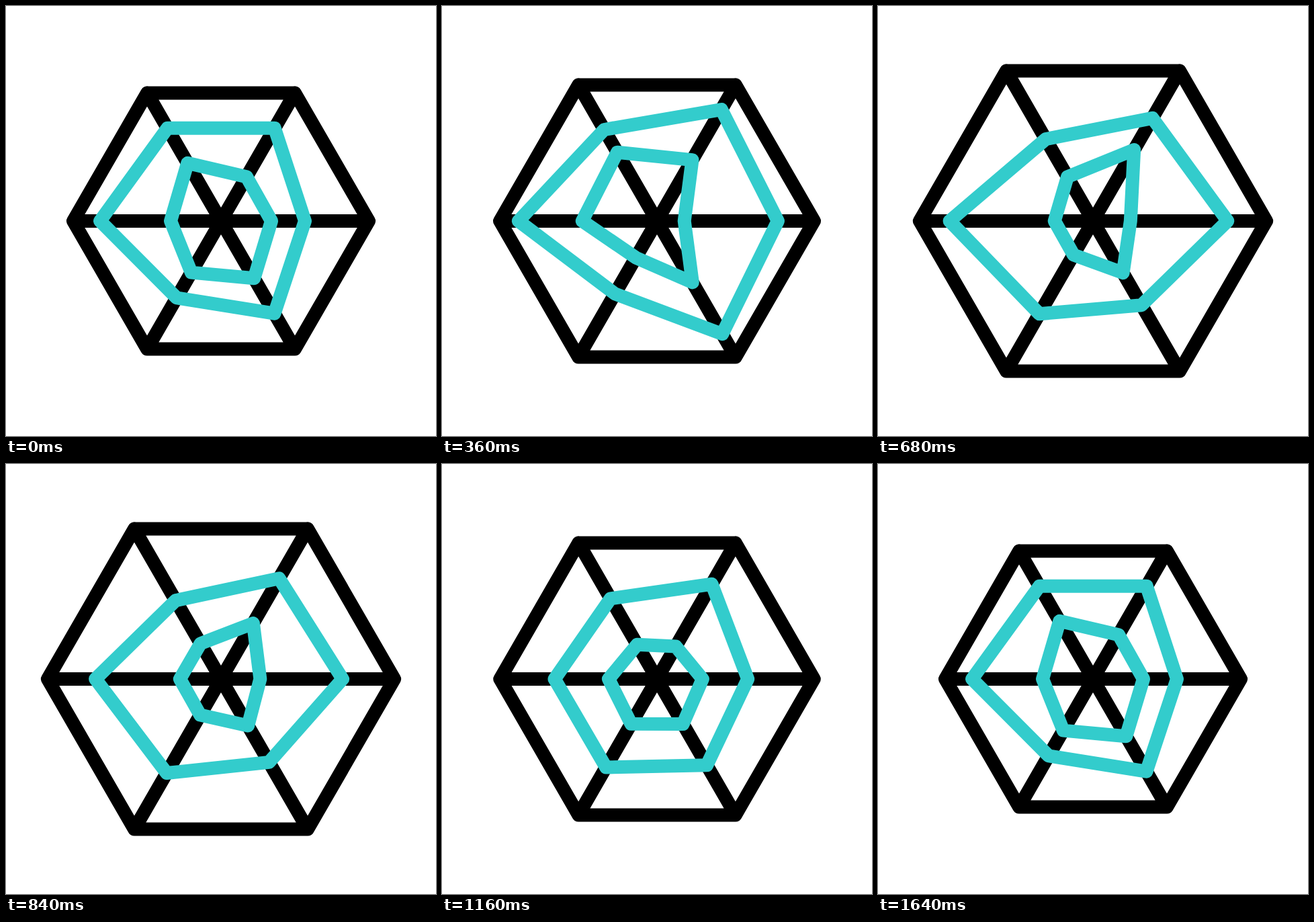
Write an HTML page that moves like this. It is 640 by 640 pixels and loops after 1.76 s.

```html
<!DOCTYPE html>
<html lang="en">
<head>
<meta charset="utf-8">
<title>Radar chart</title>
<style>
  html, body { margin: 0; height: 100%; overflow: hidden; background: #fff; }
  svg { display: block; width: 100%; height: 100%; }
  path { fill: none; stroke: #000; stroke-width: 20; stroke-linecap: round; stroke-linejoin: round; }
  .series { stroke: #3cc; }
</style>
</head>
<body>
<svg viewBox="0 0 640 640">
  <path id="grid"/>
  <path id="outer" class="series"/>
  <path id="inner" class="series"/>
</svg>
<script>
const LOOP = 1760;

// Radii along the six spokes, clockwise from the right.
const outerRest = [125, 159, 132, 180, 159.5, 159.5];
const innerRest = [75, 98.5, 88.5, 75, 99.5, 76];
const outerKeys = [
  outerRest,
  [181, 195, 125, 206.7, 157, 192.3],
  [200.5, 144, 160, 213.5, 140.5, 176.7],
  [142, 141, 165, 134, 124, 165.5],
  outerRest
];
const innerKeys = [
  innerRest,
  [40, 105.7, 62.5, 112, 118.5, 105.5],
  [56, 89, 58, 56.7, 75.5, 122.5],
  [63, 63, 69.5, 70, 32, 42.5],
  innerRest
];
const gridKeys = [220, 258.7, 220].map(r => Array(6).fill(r));

// Cubic Bezier easing (0.55, 0, 0.45, 1), solved by bisection.
function ease(x) {
  if (x <= 0 || x >= 1) return Math.min(1, Math.max(0, x));
  let low = 0, high = 1, s;
  for (let i = 0; i < 24; i++) {
    s = (low + high) / 2;
    const bx = 3 * s * (1 - s) * (0.55 * (1 - s) + 0.45 * s) + s ** 3;
    if (bx < x) low = s; else high = s;
  }
  return s * s * (3 - 2 * s);
}

function radiiAt(keys, start, step, time) {
  const position = Math.min(keys.length - 1, Math.max(0, (time - start) / step));
  const index = Math.min(keys.length - 2, Math.floor(position));
  const amount = ease(position - index);
  return keys[index].map((r, i) => r + (keys[index + 1][i] - r) * amount);
}

function corners(radii) {
  return radii.map((r, i) => {
    const angle = i * Math.PI / 3;
    return `${(320 + r * Math.cos(angle)).toFixed(2)},${(320 + r * Math.sin(angle)).toFixed(2)}`;
  });
}

const polygon = points => `M${points.join("L")}Z`;
const setPath = (id, d) => document.getElementById(id).setAttribute("d", d);

function draw() {
  const time = performance.now() % LOOP;
  const hexagon = corners(radiiAt(gridKeys, 54, 706, time));
  const spokes = [0, 1, 2].map(i => `M${hexagon[i]}L${hexagon[i + 3]}`).join("");
  setPath("grid", polygon(hexagon) + spokes);
  setPath("outer", polygon(corners(radiiAt(outerKeys, 90, 310, time))));
  setPath("inner", polygon(corners(radiiAt(innerKeys, 90, 310, time))));
  requestAnimationFrame(draw);
}
draw();
</script>
</body>
</html>
```
